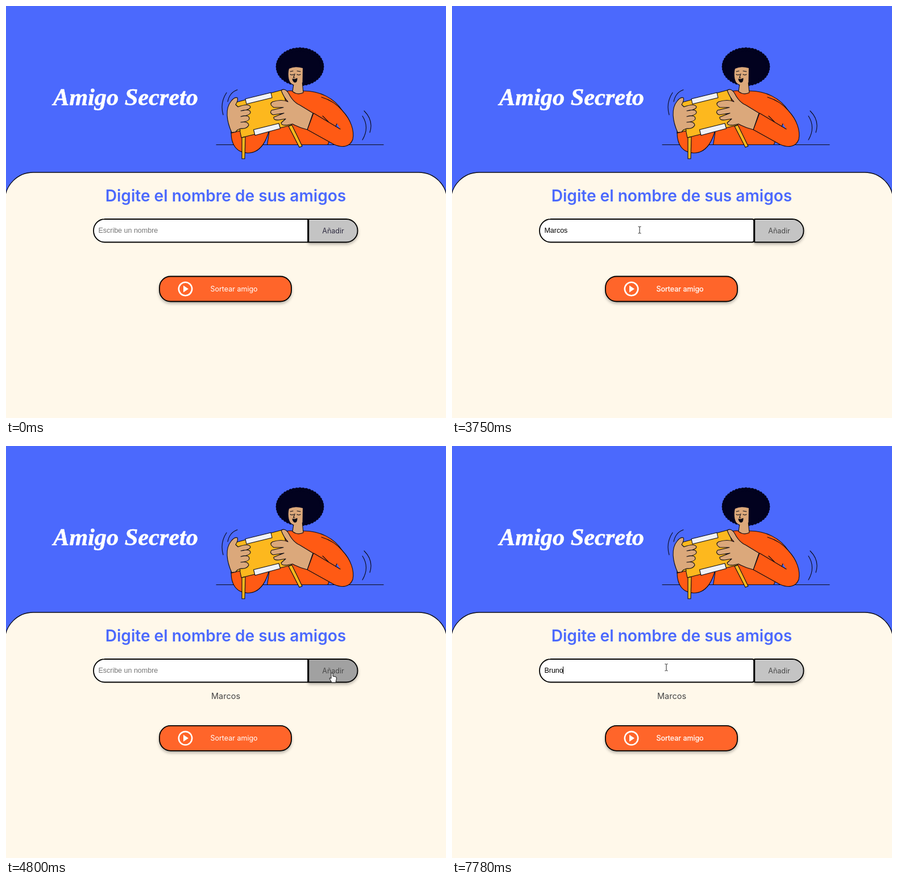
An HTML page for the animation above (8000 ms loop, 774 by 723 pixels).

```html
<!DOCTYPE html>
<html lang="es">
<head>
<meta charset="utf-8">
<title>Amigo Secreto</title>
<style>
  html, body { margin: 0; width: 100%; height: 100%; overflow: hidden; background: #4b69fd; }
  svg { display: block; }
  text { font: 12.5px Inter, sans-serif; }
  .mid { text-anchor: middle; }
  .title { font: italic 700 42.3px "Liberation Serif", serif; fill: #fff; stroke: #fff; stroke-width: .6; }
  .head { font-size: 28.1px; font-weight: 600; fill: #4b69fd; }
  .field { font-family: "Liberation Sans", Arial, sans-serif; }
  .friend { font-size: 14.5px; fill: #444; }
  .box { stroke: #000; stroke-width: 1.8; }
  .lift { filter: drop-shadow(0 3px 2.5px rgba(0, 0, 0, .28)); }
  .art { stroke: #0a0a14; stroke-width: 1.1; stroke-linejoin: round; stroke-linecap: round; fill: none; }
  .skin { fill: #dba87b; }
  .cloth { fill: #ff5a14; }
  .gold { fill: #fdb81e; }
  .tape { fill: #f1f2f6; }
  .hair { fill: #02021f; stroke: none; }
</style>
</head>
<body>
<svg width="774" height="723" viewBox="0 0 774 723">
  <rect width="774" height="723" fill="#4b69fd"/>
  <text class="title" x="83" y="174">Amigo Secreto</text>

  <g class="art">
    <path d="M370 243.5H664"/>
    <path d="M382 191Q376 170 388 152M390 168Q393 152 407 147M627 193Q640 213 627 235M630 184Q647 201 640 222"/>
    <path class="cloth" d="M396 222C396 243 405 257 425 258C445 258 457 241 463 217L414 215Z"/>
    <path class="cloth" d="M486 151Q495 148 505 149L523 149C552 149 577 161 592 184L566 243.5H459.5L464 215Z"/>
    <path class="gold" d="M401 170L487 147L502 209L414 231Z"/>
    <path class="gold" d="M396 207L410 211L412 219L396 223Z"/>
    <path class="tape" d="M421 163L466 152L468 161L423 172ZM435.500 217L480 206L482.500 215L438 227Z"/>
    <path class="gold" d="M415 231L421 229.500L420 268H415ZM497 211L503 209L521 246L516 248Z"/>
    <path class="skin" d="M397 222C388 202 385 180 396 167Q402 159 407 161Q409 165 404 173L408 177Q427 170 430 177Q430 182 413 184Q430 180 430 187Q429 192 413 194Q428 190 428 198Q427 203 413 204Q426 202 427 209Q424 216 413 215Q406 217 404 221Z"/>
    <path class="cloth" d="M555 160C572 165 583 173 592 184C607 200 613 219 610 234C605 248 591 249 577 243L530 217L541 188L588 216"/>
    <path d="M557 193L567 203"/>
    <path class="skin" d="M484 148Q490 143 497 153Q505 169 517 174L540 188L530 217Q517 214 504 207L494 209Q484 210 484 205L492 198L480 200Q470 201 471 195L489 188L470 191Q463 188 467 183L488 178L471 178Q462 172 469 168Q485 163 496 168Q489 161 484 148Z"/>
    <g id="hair" class="hair"><ellipse cx="517" cy="106.500" rx="40" ry="32"/></g>
    <path class="skin" d="M506 137L504 150Q513 157 523 152L521 132Z"/>
    <path class="skin" stroke="none" d="M498 110Q509 105 522 109L521.500 134C514 140 505 140 500 134C496 128 496 117 498 110Z"/>
    <path d="M500 120Q503 122 506 120M512 120Q515 122 518 120M500 115L505 114M512 114L518 115M508 119L505.500 126H508"/>
    <path d="M504 128Q508 130 512 127Q512 134 508 134Q505 133 504 128Z" fill="#0a0a14"/>
  </g>

  <rect x="-2" y="292" width="778" height="500" rx="50" fill="#fff8ea" stroke="#0a0a14" stroke-width="1.3"/>
  <text class="head mid" x="386.500" y="343">Digite el nombre de sus amigos</text>

  <path id="add" class="box lift" d="M532.300 374H598.500a20 20 0 0 1 20 20v.5a20 20 0 0 1-20 20H532.300Z"/>
  <text id="addText" class="mid" x="575.500" y="399">Añadir</text>
  <path id="input" class="box" fill="#fff"/>
  <text id="value" class="field" x="162.400" y="398.300"></text>
  <rect id="caret" y="387" width="1" height="13"/>
  <text id="friend" class="friend mid" x="386.500" y="444">Marcos</text>

  <g id="draw">
    <rect class="box lift" x="270" y="474.500" width="232" height="44" rx="19.500" fill="#ff652a"/>
    <circle cx="315.500" cy="496.500" r="11.700" fill="none" stroke="#fff" stroke-width="2.600"/>
    <path d="M312 490.500L321 496.500L312 502.500Z" fill="#fff"/>
    <text id="drawText" class="mid" x="401" y="501" fill="#fff" stroke="#fff">Sortear amigo</text>
  </g>

  <g id="pointer">
    <circle id="press" r="9.500" fill="#dcd728" fill-opacity=".72"/>
    <path id="arrow" d="M0 0V16L4 12.500L6.500 18L9 17L6.500 11.500H11.500Z" fill="#fff" stroke="#111"/>
    <path id="beam" d="M-2.500-6Q0-6 0-5Q0-6 2.500-6M0-5V5M-2.500 6Q0 6 0 5Q0 6 2.500 6" fill="none" stroke="#222"/>
    <path id="hand" d="M-1 0Q1 -1.500 2 0V5L7 6Q9 6.500 8.500 9L7 16H0L-4 9Q-4.500 7 -1 9Z" fill="#fff" stroke="#111"/>
  </g>
</svg>
<script>
const $ = id => document.getElementById(id);
const show = (id, on) => $(id).setAttribute('visibility', on ? 'visible' : 'hidden');
const set = (id, name, v) => $(id).setAttribute(name, v);
const within = (t, spans) => spans.some(([a, b]) => t >= a && t < b);

const LOOP = 8000, ADDED = 4800;
const first = { word: 'Marcos', keys: [1220, 2170, 2480, 2610, 3280, 3480] };
const second = { word: 'Bruno', keys: [6700, 7200, 7390, 7590, 7780] };
const focusSpans = [[320, 4750], [5430, LOOP]];
const pressSpans = [[320, 390], [4750, 4800], [5430, 5490]];
const caretSpans = [[320, 720], [1090, 1680], [2170, 3150], [3280, 3750], [4280, 4750], [5430, 5970], [6430, LOOP]];

// pointer stops: time, x, y
const stops = [
  [40, 347, 410], [120, 330, 393],
  [4280, 336, 393], [4340, 365, 394], [4400, 415, 396], [4470, 475, 398],
  [4530, 530, 399], [4590, 560, 399], [4650, 573, 399],
  [4960, 556, 399], [5020, 505, 398], [5080, 446, 396], [5140, 401, 394], [5210, 377, 388.5]
];

// scalloped edge of the hair
for (let i = 0; i < 44; i++) {
  const a = i / 44 * 2 * Math.PI;
  const c = document.createElementNS('http://www.w3.org/2000/svg', 'circle');
  c.setAttribute('cx', 517 + 39 * Math.cos(a));
  c.setAttribute('cy', 106.5 + 30.5 * Math.sin(a));
  c.setAttribute('r', 3.4);
  $('hair').append(c);
}

function inputPath(r) {
  return `M173 374H${531 - r}a${r} ${r} 0 0 1 ${r} ${r}V${414.5 - r}a${r} ${r} 0 0 1 ${-r} ${r}H173.500a19.500 20 0 0 1-19.500-20v-.5a19.500 20 0 0 1 19.500-20Z`;
}

function render(t) {
  const focus = within(t, focusSpans), added = t >= ADDED;
  const { word, keys } = added ? second : first;
  const typed = word.slice(0, keys.filter(k => k <= t).length);
  const value = $('value');
  value.textContent = typed || 'Escribe un nombre';
  set('value', 'fill', typed ? '#000' : '#757575');
  set('caret', 'x', typed ? Math.floor(162.4 + value.getComputedTextLength()) : 162);
  show('caret', within(t, caretSpans));
  set('input', 'd', inputPath(focus ? 3 : 0));
  show('friend', added);
  set('draw', 'transform', `translate(0 ${added ? 16.3 : 0})`);
  set('drawText', 'stroke-width', focus ? .25 : 0);

  const stop = stops.filter(s => s[0] <= t).pop();
  const [, x, y] = stop || [0, -99, -99];
  const over = x > 532, low = y > 405;
  set('pointer', 'transform', `translate(${x} ${y})`);
  show('hand', over);
  show('arrow', low);
  show('beam', !over && !low);
  show('press', within(t, pressSpans));
  set('add', 'fill', over ? '#a1a1a1' : '#c4c4c4');
  set('addText', 'fill', t < 320 ? '#2f2c40' : '#484848');
}

const start = performance.now();
function tick() {
  render((performance.now() - start) % LOOP);
  requestAnimationFrame(tick);
}
tick();
</script>
</body>
</html>
```
